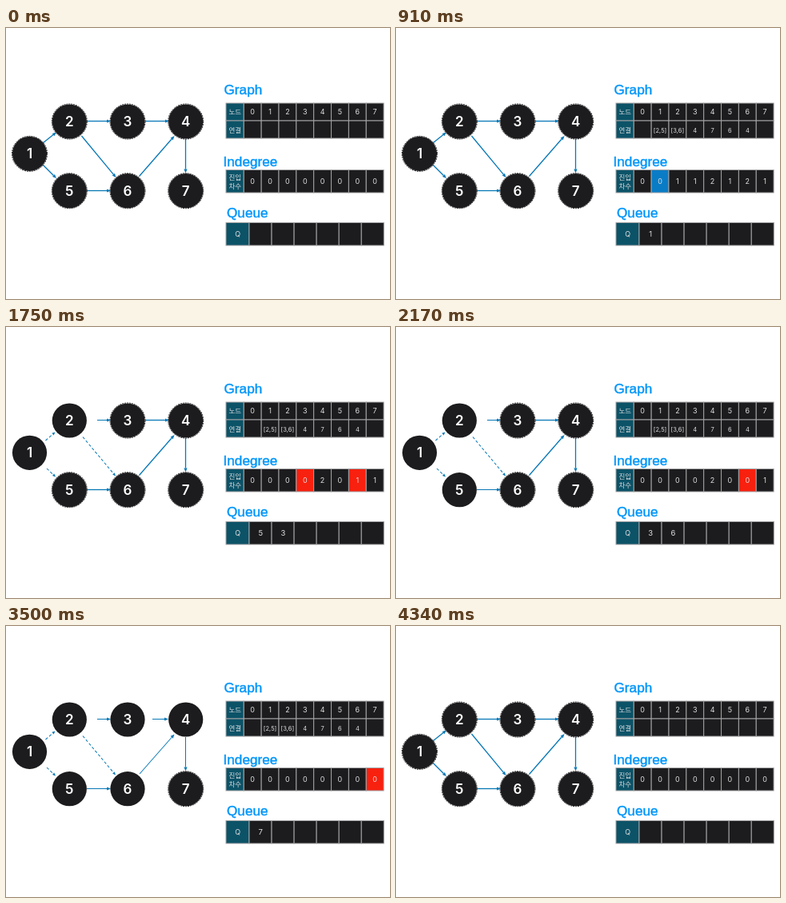
Animation, 480 px wide and 339 px high, one loop 4410 ms. Source, as an HTML page with a canvas:

```html
<!DOCTYPE html>
<html lang="ko">
<head>
<meta charset="utf-8">
<title>Topological sort</title>
<style>
html, body { margin: 0; width: 100%; height: 100%; overflow: hidden; background: #fff; }
canvas { display: block; width: 480px; height: 339px; }
</style>
</head>
<body>
<canvas id="stage"></canvas>
<script>
const canvas = document.getElementById('stage');
const g = canvas.getContext('2d');
const dpr = window.devicePixelRatio || 1;
canvas.width = 480 * dpr;
canvas.height = 339 * dpr;

const LOOP = 4410;
const DARK = '#1c1c1e', TEAL = '#0c5368', LINE = '#a2a2a4', PALE = '#dededf';
const BLUE = '#0a7cc6', RED = '#f8200f', ARROW = '#0878b6', TITLE = '#0096fa';
const SANS = 'Inter, "Noto Sans CJK KR", "Noto Sans CJK", sans-serif';

const nodes = {
  1: [29.5, 157.3], 2: [79.3, 117], 3: [152, 117], 4: [224.7, 117],
  5: [79.3, 203.7], 6: [152, 203.7], 7: [224.7, 203.7]
};
const visitOrder = '1253647';
const links = ['', '[2,5]', '[3,6]', '4', '7', '6', '4', ''];

// line: resting arrow, used: arrow once its start node is visited
const edges = [
  { from: '1', line: [46, 144, 63, 130.5], used: [49.5, 142, 61.5, 131.5], dash: true },
  { from: '1', line: [46, 171, 63, 188], used: [51, 177, 62, 187.5], dash: true },
  { from: '2', line: [101, 116.5, 131, 116.5], used: [114, 116.5, 131, 116.5] },
  { from: '2', line: [94.5, 135, 137.5, 187], used: [96, 137.5, 137, 186.5], dash: true },
  { from: '3', line: [174, 116.5, 204, 116.5], used: [183, 116.5, 203, 116.5] },
  { from: '5', line: [101, 203.5, 131, 203.5], used: [101, 203.5, 131, 203.5] },
  { from: '6', line: [166.5, 185.5, 210.5, 135], used: [167, 185, 210.5, 135.5] },
  { from: '4', line: [224.5, 139, 224.5, 181.5], used: [224.5, 139, 224.5, 181.5] }
];

const steps = [
  { at: 0, deg: '00000000', queue: '', hot: '', done: 0, empty: true },
  { at: 490, deg: '00112121', queue: '', hot: '', done: 0 },
  { at: 910, deg: '00112121', queue: '1', hot: '1', done: 0, tint: BLUE },
  { at: 1330, deg: '00012021', queue: '25', hot: '25', done: 1, tint: '#fd0a12' },
  { at: 1750, deg: '00002011', queue: '53', hot: '36', done: 2 },
  { at: 2170, deg: '00002001', queue: '36', hot: '6', done: 3 },
  { at: 2590, deg: '00001001', queue: '6', hot: '4', done: 4 },
  { at: 3010, deg: '00000001', queue: '4', hot: '4', done: 5 },
  { at: 3500, deg: '00000000', queue: '7', hot: '7', done: 6 },
  { at: 3920, deg: '00000000', queue: '', hot: '', done: 7 }
];
steps.push({ ...steps[0], at: 4340 });

function label(text, x, y, size, color = PALE, weight = 400) {
  g.font = `${weight} ${size}px ${SANS}`;
  g.textAlign = 'center';
  g.fillStyle = color;
  g.fillText(text, x, y + size * 0.364);
}

function title(text, x, baseline) {
  g.font = '17.2px "Liberation Sans", Arial, sans-serif';
  g.textAlign = 'left';
  g.fillStyle = g.strokeStyle = TITLE;
  g.lineWidth = 0.45;
  g.fillText(text, x, baseline);
  g.strokeText(text, x, baseline);
}

function cell(x, y, w, h, fill) {
  g.fillStyle = fill;
  g.fillRect(x, y, w, h);
  g.strokeStyle = LINE;
  g.lineWidth = 1;
  g.strokeRect(x, y, w, h);
}

function arrow([x1, y1, x2, y2], width, dash) {
  const head = dash ? 4 : 5;
  g.save();
  g.translate(x2, y2);
  g.rotate(Math.atan2(y2 - y1, x2 - x1));
  g.strokeStyle = g.fillStyle = ARROW;
  g.lineWidth = width;
  g.setLineDash(dash ? [3.5, 2.5] : []);
  g.beginPath();
  g.moveTo(-Math.hypot(x2 - x1, y2 - y1), 0);
  g.lineTo(-head, 0);
  g.stroke();
  g.beginPath();
  g.moveTo(0, 0);
  g.lineTo(-head, -head * 0.42);
  g.lineTo(-head, head * 0.42);
  g.fill();
  g.restore();
}

function node(name, visited) {
  const [x, y] = nodes[name];
  g.beginPath();
  g.arc(x, y, 21.6, 0, Math.PI * 2);
  g.fillStyle = DARK;
  g.fill();
  if (!visited) {
    g.beginPath();
    g.arc(x, y, 22, 0, Math.PI * 2);
    g.strokeStyle = DARK;
    g.lineWidth = 1;
    g.setLineDash([2, 1]);
    g.stroke();
    g.setLineDash([]);
  }
  label(name, x, y, 17, '#fff', 600);
}

function tables(s) {
  title('Graph', 272.5, 83.3);
  cell(275, 94, 22.3, 22, TEAL);
  cell(275, 116, 22.3, 22, TEAL);
  label('노드', 286.3, 105, 8.5);
  label('연결', 286.3, 127.5, 8.5);

  title('Indegree', 271.5, 172.6);
  cell(275, 177.5, 22.3, 28.5, TEAL);
  label('진입', 286.3, 186.5, 8.5);
  label('차수', 286.3, 197.5, 8.5);

  for (let i = 0; i < 8; i++) {
    const x = 297.3 + i * 21.85, mid = x + 10.9;
    cell(x, 94, 21.85, 22, DARK);
    cell(x, 116, 21.85, 22, DARK);
    cell(x, 177.5, 21.85, 28.5, s.hot.includes(i) ? s.tint || RED : DARK);
    label(i, mid, 105, 9);
    if (!s.empty) label(links[i], mid, 127.8, 7.5);
    label(s.deg[i], mid, 192, 9);
  }

  title('Queue', 276, 236.8);
  cell(275, 243.5, 29, 28.5, TEAL);
  label('Q', 289.7, 258, 9);
  for (let i = 0; i < 6; i++) {
    const x = 304 + i * 28.05;
    cell(x, 243.5, 28.05, 28.5, DARK);
    label(s.queue[i] || '', x + 14.3, 258, 9.5);
  }
}

function draw(s) {
  const visited = visitOrder.slice(0, s.done);
  g.setTransform(dpr, 0, 0, dpr, 0, 0);
  g.fillStyle = '#fff';
  g.fillRect(0, 0, 480, 339);
  for (const e of edges) {
    const used = visited.includes(e.from);
    arrow(used ? e.used : e.line, used ? 1 : 1.3, used && e.dash);
  }
  for (const name in nodes) node(name, visited.includes(name));
  tables(s);
}

const start = performance.now();
function tick() {
  const t = (performance.now() - start) % LOOP;
  draw(steps.findLast(s => s.at <= t));
  requestAnimationFrame(tick);
}
tick();
</script>
</body>
</html>
```
